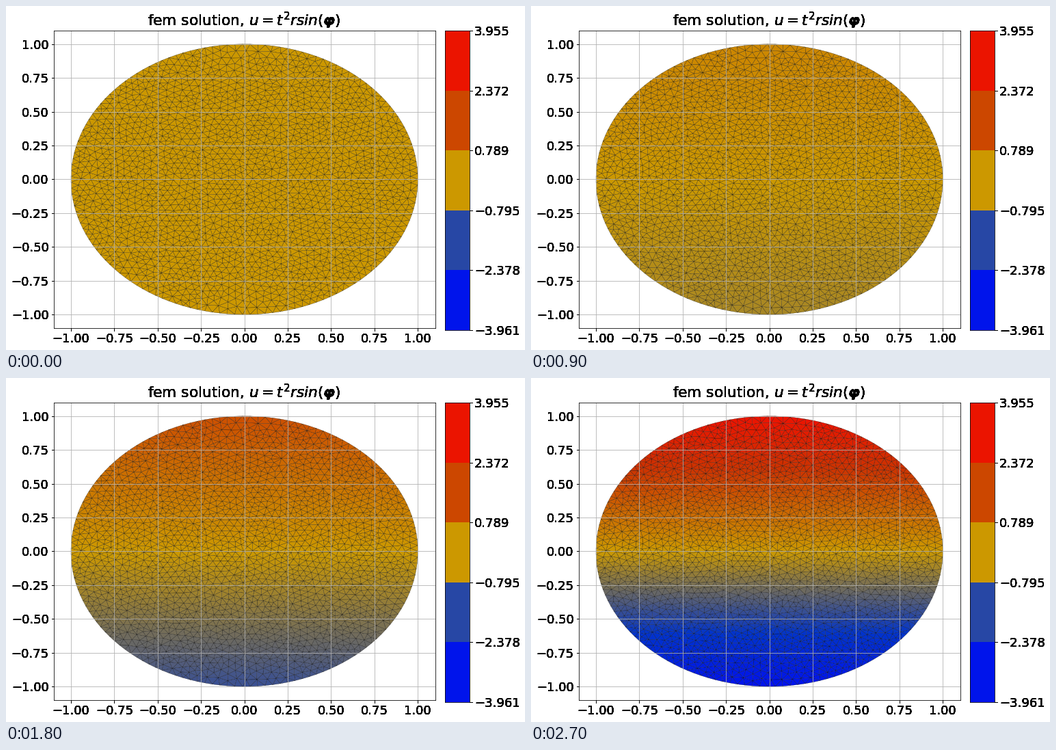
A matplotlib script for the animation above (3 s loop, 759x503 px).

```python
import numpy as np
import matplotlib.pyplot as plt
from matplotlib.animation import FuncAnimation
from matplotlib.colors import LinearSegmentedColormap
from matplotlib.tri import Triangulation

W, H, DPI = 759, 503, 72
FRAMES, INTERVAL = 10, 300
TIME_STEP = 0.2
U_MIN, U_MAX = -3.961, 3.955
MESH_SIZE = 0.044
TEXT_PASSES = 8  # repeated passes give the labels their heavy, hard edges

plt.rcParams.update({"font.family": "DejaVu Sans", "font.size": 18})
cmap = LinearSegmentedColormap.from_list(
    "heat", [(0, 0, 1), (0, 0.2, 0.8), (0.8, 0.6, 0), (0.8, 0.2, 0), (1, 0, 0)])


def disc_mesh(h, smoothing=8, seed=4):
    """Unstructured triangle mesh of the unit disc with edges of about h."""
    rng = np.random.default_rng(seed)
    n_rim = round(2 * np.pi / h)
    angle = 2 * np.pi * np.arange(n_rim) / n_rim
    n = int(1 / h) + 2
    col, row = np.meshgrid(np.arange(-n, n + 1), np.arange(-n, n + 1))
    grid = np.stack([(col + 0.5 * (row % 2)) * h, row * h * np.sqrt(0.75)], -1).reshape(-1, 2)
    grid += rng.uniform(-0.55, 0.55, grid.shape) * h
    inner = grid[np.hypot(*grid.T) < 1 - 0.6 * h]
    points = np.vstack([np.stack([np.cos(angle), np.sin(angle)], -1), inner])

    for _ in range(smoothing):
        cells = Triangulation(*points.T).triangles
        a, b, c = (points[cells[:, i]] for i in range(3))
        u, v = b - a, c - a
        area = np.repeat(np.abs(u[:, 0] * v[:, 1] - u[:, 1] * v[:, 0]), 3)
        centre = np.repeat((a + b + c) / 3, 3, axis=0)
        weight = np.bincount(cells.ravel(), area, len(points))
        for axis in range(2):
            total = np.bincount(cells.ravel(), area * centre[:, axis], len(points))
            points[n_rim:, axis] = total[n_rim:] / weight[n_rim:]
    return Triangulation(*points.T)


def add_axes(left, top, width, height, overlay):
    ax = fig.add_axes([left / W, 1 - (top + height) / H, width / W, height / H])
    if overlay:
        ax.patch.set_visible(False)
        ax.spines[:].set_visible(False)
    return ax


def add_plot(overlay=False):
    ax = add_axes(69.6, 35.98, 558, 434.88, overlay)
    ticks = np.linspace(-1, 1, 9)
    ax.set(xlim=(-1.1, 1.1), ylim=(-1.1, 1.1), xticks=ticks, yticks=ticks)
    ax.set_title(r"fem solution, $u=t^2rsin(\mathbfit{\varphi})$")
    return ax


def add_colorbar(overlay=False):
    ax = add_axes(642, 35.98, 36, 437.76, overlay)
    levels = np.linspace(U_MIN, U_MAX, 6)
    labels = [f"{v:.3f}".replace("-", "\u2212") for v in levels]
    ax.set(xlim=(0, 1), ylim=(U_MIN, U_MAX), xticks=[])
    ax.yaxis.tick_right()
    ax.set_yticks(levels, labels)
    if not overlay:
        middles = (levels[:-1] + levels[1:]) / 2
        ax.pcolormesh([0, 1], levels, middles[:, None], cmap=cmap, vmin=U_MIN, vmax=U_MAX)
    return ax


fig = plt.figure(figsize=(W / DPI, H / DPI), dpi=DPI, facecolor="white")
plot = add_plot()
add_colorbar()

tri = disc_mesh(MESH_SIZE)
height = tri.y[tri.triangles].mean(axis=1)
mesh = plot.tripcolor(tri, facecolors=0 * height, cmap=cmap, vmin=U_MIN, vmax=U_MAX,
                      edgecolors="k")
plot.grid(True)
plot.set(xlim=(-1.1, 1.1), ylim=(-1.1, 1.1))

for _ in range(TEXT_PASSES - 1):
    add_plot(overlay=True)
    add_colorbar(overlay=True)


def update(frame):
    t = TIME_STEP * frame
    mesh.set_array(t ** 2 * height)
    return [mesh]


anim = FuncAnimation(fig, update, frames=FRAMES, interval=INTERVAL, repeat=True,
                     repeat_delay=0, blit=False)
plt.show()
```
